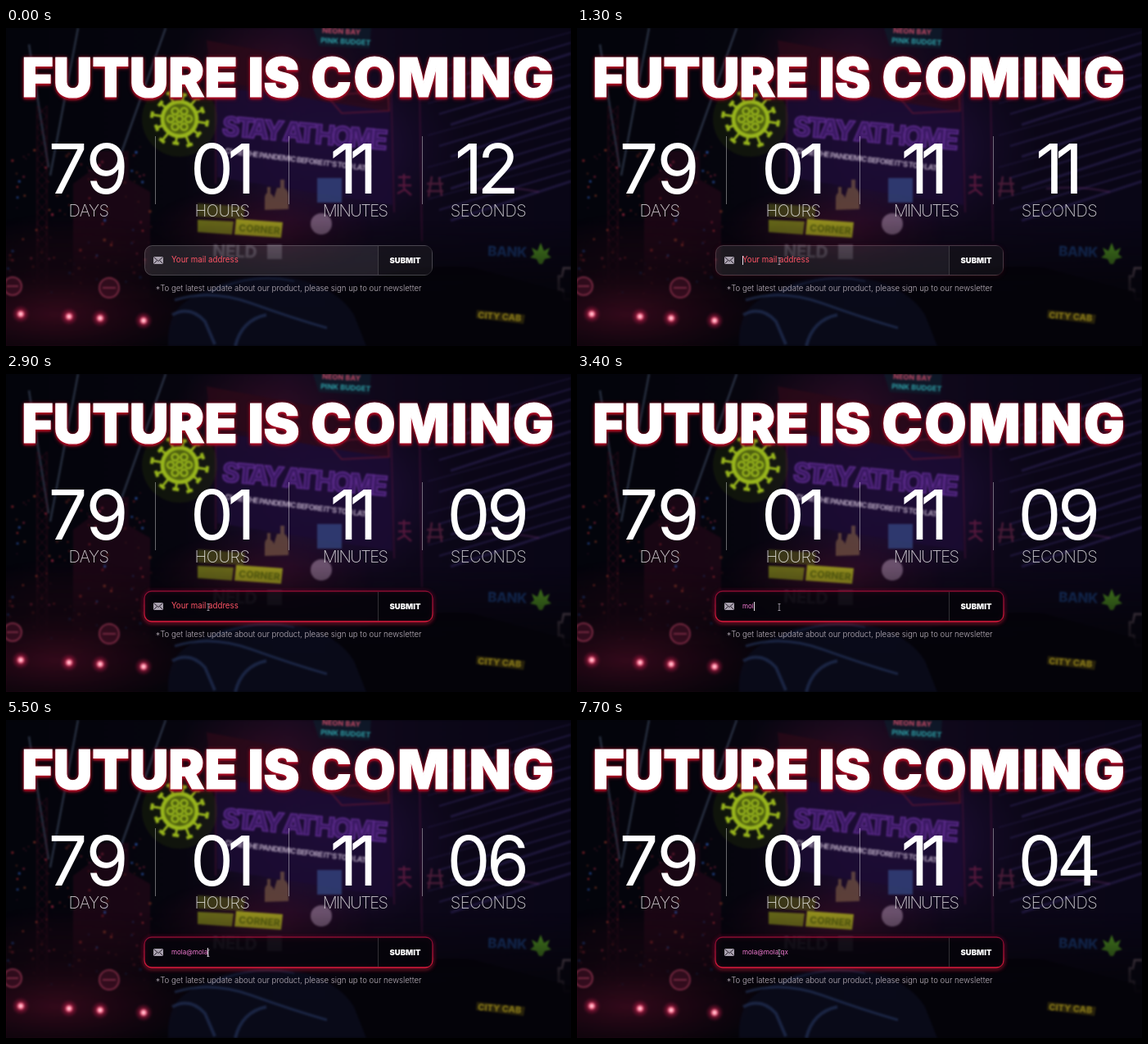
An HTML page for the animation above (8 s loop, 690 px wide and 388 px high).

```html
<!DOCTYPE html>
<html lang="en">
<head>
<meta charset="utf-8">
<title>Future is coming</title>
<style>
html, body { margin: 0; width: 100%; height: 100%; overflow: hidden; background: #05040a; }
svg { display: block; width: 690px; height: 388px; }
text { font-family: Inter, "Open Sans", sans-serif; fill: #fff; white-space: pre; }
.mid { text-anchor: middle; }
.title { font-size: 66px; font-weight: 900; stroke: #fff; stroke-width: 1.2px;
  filter: drop-shadow(0 2px 1px #b00a24) drop-shadow(0 0 2px #90081c); }
.wide { letter-spacing: 2.6px; }
.digits { font-size: 84px; font-weight: 400; }
.label { font-size: 20px; font-weight: 200; letter-spacing: -.5px; fill-opacity: .8; }
.tight { letter-spacing: -1.6px; }
.hint { font-size: 9.7px; fill: #ff5566; }
.typed { font-size: 8px; fill: #f27bd2; }
.submit { font-size: 9.5px; font-weight: 900; }
.note { font-size: 9.65px; font-weight: 300; fill: #b9b0ba; }
.scene { filter: blur(1.2px); }
.scene text { font-weight: 800; }
</style>
</head>
<body>
<svg viewBox="0 0 690 388" xmlns="http://www.w3.org/2000/svg">
  <defs>
    <linearGradient id="sky">
      <stop offset="0" stop-color="#03040b"/>
      <stop offset=".3" stop-color="#06050e"/>
      <stop offset=".5" stop-color="#150a1f"/>
      <stop offset=".75" stop-color="#0c0718"/>
      <stop offset="1" stop-color="#090616"/>
    </linearGradient>
    <radialGradient id="violet"><stop stop-color="#45207a" stop-opacity=".45"/><stop offset="1" stop-color="#2a1050" stop-opacity="0"/></radialGradient>
    <radialGradient id="red"><stop stop-color="#6e1230" stop-opacity=".5"/><stop offset="1" stop-color="#4a0a20" stop-opacity="0"/></radialGradient>
    <radialGradient id="lamp"><stop stop-color="#fff0f4"/><stop offset=".25" stop-color="#ff7d9a"/><stop offset=".5" stop-color="#b81c46" stop-opacity=".5"/><stop offset="1" stop-color="#901038" stop-opacity="0"/></radialGradient>
    <linearGradient id="road" x2="0" y2="1"><stop stop-color="#05040a" stop-opacity="0"/><stop offset=".5" stop-color="#05040a" stop-opacity=".8"/><stop offset="1" stop-color="#05040a" stop-opacity=".95"/></linearGradient>
    <linearGradient id="edge" x2="0" y2="1"><stop stop-color="#850d30"/><stop offset=".6" stop-color="#a81034"/><stop offset="1" stop-color="#dc1a3c"/></linearGradient>
    <filter id="glow" x="-20%" y="-60%" width="140%" height="220%"><feGaussianBlur stdDeviation="2.500"/></filter>
    <clipPath id="box"><rect x="169" y="265" width="352" height="37" rx="9"/></clipPath>
  </defs>

  <g class="scene">
    <rect width="690" height="388" fill="url(#sky)"/>
    <ellipse cx="390" cy="145" rx="170" ry="110" fill="url(#violet)"/>
    <ellipse cx="320" cy="50" rx="120" ry="70" fill="url(#red)" opacity=".7"/>
    <ellipse cx="70" cy="335" rx="180" ry="110" fill="url(#red)"/>
    <ellipse cx="310" cy="250" rx="140" ry="60" fill="url(#red)" opacity=".7"/>

    <g stroke="#6d84a8" stroke-width="2.500" opacity=".32">
      <path d="M88 0L54 180M28 20L52 170M195 0L131 180"/>
    </g>
    <path d="M82 330V190L112 168V150H150V185L176 200V330Z" fill="#4a1026" opacity=".3"/>
    <g stroke="#4b1024" fill="none" opacity=".55"><path id="tower"/></g>
    <g id="lights"></g>
    <g id="floors" stroke="#362a66" opacity=".45"></g>

    <path d="M256 72L468 96L472 216L258 182Z" fill="#1c0c33" opacity=".85"/>
    <path d="M256 60L256 190M470 60L474 225M505 70L508 260" stroke="#54143e" stroke-width="2" opacity=".45"/>
    <path d="M245 15L380 40L470 78L468 102L380 88L250 62Z" fill="#2c0a18" opacity=".75"/>
    <path d="M392 83L466 76L468 101L410 104Z" fill="none" stroke="#701a34" stroke-width="2" opacity=".55"/>
    <path d="M375 0H446L444 25L382 22Z" fill="#0f1f2d" opacity=".7"/>
    <text x="386" y="6" font-size="9" style="fill:#b0455f" transform="rotate(3 386 6)">NEON BAY</text>
    <text x="384" y="18" font-size="9" style="fill:#2b8f98" transform="rotate(3 384 18)">PINK BUDGET</text>

    <text x="263" y="131" font-size="33" style="fill:#3d1a66;stroke:#5f2d90;stroke-width:1.6;letter-spacing:-4.200px" transform="rotate(5 263 131)" opacity=".95">STAY AT HOME</text>
    <text x="267" y="153" font-size="9.400" style="fill:#c4b4cc;letter-spacing:-.75px" transform="rotate(7 267 153)" opacity=".8">CURE THE PANDEMIC BEFORE IT'S TOO LATE</text>

    <circle cx="212" cy="111" r="46" fill="#33440a" opacity=".25"/>
    <g id="virus" fill="none" stroke="#97b41c"></g>

    <rect x="380" y="183" width="30" height="30" fill="#3a5290" opacity=".65"/>
    <circle cx="385" cy="239" r="13" fill="#a98ca9" opacity=".55"/>
    <g opacity=".6">
      <text x="252" y="279" font-size="21" style="fill:#8f7f92;letter-spacing:-.5px" transform="rotate(2 252 279)">NELD</text>
      <rect x="319" y="264" width="18" height="18" fill="#8f7f92"/>
    </g>
    <path d="M316 222V208q0-5 3-7v-7h4v8q4 2 4 6l4-13h4v-10h5v10q5 4 5 10v16z" fill="#8f6c4c" opacity=".55"/>
    <path d="M234 214L292 218L290 233L234 230Z" fill="#77801c" opacity=".4"/>
    <path d="M234 234L278 236L276 252L234 249Z" fill="#98a41c" opacity=".6"/>
    <path d="M281 233L338 237L336 256L279 252Z" fill="#c0c81f" opacity=".7"/>
    <text x="284" y="248" font-size="12" style="fill:#4d560c" transform="rotate(4 284 248)" opacity=".8">CORNER</text>

    <g fill="none" stroke-width="2.500" opacity=".4">
      <path d="M479 182h15M486 178v18M479 192h16M478 202l9-5 8 7" stroke="#b52f63"/>
      <path d="M514 190h20M520 181l-4 25M529 182l3 23M514 199h20" stroke="#a03a62"/>
      <path d="M573 196q40-4 78 4" stroke="#5a2b63"/>
    </g>
    <text x="588" y="278" font-size="17" style="fill:#20509a;letter-spacing:-.5px" transform="rotate(2 588 278)" opacity=".65">BANK</text>
    <path d="M0-14L4-4L11-8L8 0L13 4L5 6L2 12H-2L-5 6L-13 4L-8 0L-11-8L-4-4Z" fill="#5fb023" opacity=".85" transform="translate(653 276)"/>
    <path d="M690 293h-9l-2 10h-4v16h5l2 12h8" fill="none" stroke="#c0a0ac" stroke-width="3" opacity=".6"/>

    <rect y="235" width="690" height="153" fill="url(#road)"/>
    <ellipse cx="60" cy="350" rx="170" ry="60" fill="url(#red)" opacity=".8"/>
    <path d="M390 330Q470 285 570 292L690 325V388H390Z" fill="#040309" opacity=".8"/>
    <path d="M198 388Q196 348 222 332Q270 300 330 302Q400 310 425 350L440 388Z" fill="#0a0c1c" opacity=".8"/>
    <g fill="none" stroke="#2b3f6c" opacity=".5">
      <path d="M206 332Q250 318 300 336T392 366" stroke-width="3"/>
      <path d="M203 350q22-12 40 8l12 28M318 350q-30 6-38 38" stroke-width="4"/>
      <path d="M250 322Q300 298 352 309" stroke-width="1.500"/>
    </g>
    <path d="M575 344L634 350L632 361L574 354Z" fill="#7a6a12" opacity=".3"/>
    <text x="576" y="354" font-size="11" style="fill:#b8a420" transform="rotate(4 576 354)" opacity=".65">CITY CAB</text>
    <g fill="#6a1c38" fill-opacity=".5" stroke="#a33a58" stroke-width="2" opacity=".65">
      <circle cx="8" cy="315" r="11"/><path d="M1 315h14"/>
      <circle cx="126" cy="317" r="12"/><path d="M118 317h16"/>
    </g>
    <g id="lamps" fill="url(#lamp)"></g>
  </g>

  <g class="title mid">
    <text x="151" y="83.500">FUTURE</text><text x="327" y="83.500">IS</text><text class="wide" x="522" y="83.500">COMING</text>
  </g>
  <path d="M182.500 132V215M345.500 132V215M508.500 132V215" stroke="#fff" stroke-opacity=".4"/>
  <g class="digits mid" id="fixed"></g>
  <g class="digits mid" id="secs"></g>
  <g class="label mid">
    <text x="101" y="230">DAYS</text><text x="264" y="230">HOURS</text>
    <text class="tight" x="426" y="230">MINUTES</text><text x="589" y="230">SECONDS</text>
  </g>

  <g id="idle">
    <rect x="169.500" y="265.500" width="351" height="36" rx="9" fill="#fff" fill-opacity=".11" stroke="#fff" stroke-opacity=".22"/>
  </g>
  <g id="focus">
    <rect x="169" y="266" width="352" height="37" rx="9" fill="none" stroke="url(#edge)" stroke-width="3" opacity=".75" filter="url(#glow)"/>
    <rect x="169" y="265" width="352" height="37" rx="9" fill="#06040b" fill-opacity=".75" stroke="url(#edge)" stroke-width="1.300"/>
  </g>
  <g clip-path="url(#box)">
    <rect x="454" y="266" width="66" height="35" fill="#05030a" fill-opacity=".45"/>
    <path d="M454.500 266V301" stroke="#fff" stroke-opacity=".18"/>
  </g>
  <rect x="180" y="279" width="12" height="9" rx="1" fill="#a8a1ae"/>
  <path d="M180.500 279.500L186 284.500L191.500 279.500M180.500 287.500L184.500 283.500M191.500 287.500L187.500 283.500" fill="none" stroke="#1c1522" stroke-width=".9"/>
  <text class="hint" id="hint" x="202" y="286">Your mail address</text>
  <text class="typed" id="typed" x="202" y="286"></text>
  <rect id="caret" y="278" width="1" height="11" fill="#e9dfea"/>
  <text class="submit mid" x="487.500" y="287">SUBMIT</text>
  <text class="note mid" x="345" y="320.500">*To get latest update about our product, please sign up to our newsletter</text>

  <g id="mouse">
    <path id="beam" d="M-1.500-4H1.500M0-4V4M-1.500 4H1.500" stroke="#c8c0cc" fill="none" stroke-width=".7"/>
    <path id="arrow" d="M0 0V10L2.400 7.800L4 11.300L5.500 10.600L4 7.300H7Z" fill="#fff" stroke="#111" stroke-width=".6"/>
  </g>
</svg>

<script>
const $ = id => document.getElementById(id);
const LOOP = 8000, BLINK = 515, FOCUS = 1225;
const MAIL = "mola@mola.qx";
const KEYS = [2960, 3160, 3360, 3560, 4460, 4960, 5060, 5260, 5360, 6460, 6960, 7090];

let seed = 7;
const rnd = () => (seed = seed * 16807 % 2147483647) / 2147483647;
const repeat = (n, f) => Array.from({ length: n }, (_, i) => f(i)).join("");

// Static scenery
$("lights").innerHTML = repeat(130, () => {
  const x = rnd() * 178, y = 145 + rnd() * 180;
  const hue = rnd() < .8 ? 340 + rnd() * 35 : 220;
  return `<circle cx="${x}" cy="${y}" r="${.6 + rnd() * 1.3}" fill="hsl(${hue} 60% 48%)" opacity="${.2 + rnd() * .5}"/>`;
});
$("floors").innerHTML = repeat(15, i => {
  const y = 25 + i * 13;
  return `<path d="M${515 + i % 3 * 14} ${y + 28}L690 ${y - 20}" stroke-width="${1 + i % 3}"/>`;
});
$("tower").setAttribute("d", "M38 95V330M50 95V330" + repeat(18, i => `M38 ${95 + i * 13}l12 13M50 ${95 + i * 13}l-12 13`));
$("lamps").innerHTML = [[18, 349], [77, 352], [115, 354], [168, 357]]
  .map(([x, y]) => `<circle cx="${x}" cy="${y}" r="11"/>`).join("");
$("virus").innerHTML =
  `<circle cx="212" cy="111" r="21" stroke-width="5" fill="#4f610f"/>` +
  repeat(12, i => {
    const a = (i + .3) * Math.PI / 6, c = Math.cos(a), s = Math.sin(a), r = i % 2 ? 30 : 34;
    const x = 212 + c * r, y = 111 + s * r;
    return `<path d="M${212 + c * 21} ${111 + s * 21}L${x} ${y}" stroke-width="3"/>
      <path d="M${x - s * 4} ${y + c * 4}L${x + s * 4} ${y - c * 4}" stroke-width="4"/>`;
  }) +
  repeat(7, i => {
    const a = i * Math.PI / 3, r = i ? 11 : 0;
    return `<circle cx="${212 + Math.cos(a) * r}" cy="${111 + Math.sin(a) * r}" r="4" stroke-width="2.5"/>`;
  });

// Digits sit side by side; a 1 takes half the room
function digits(cx, value) {
  const adv = d => d === "1" ? 24 : 48;
  const list = [...value];
  let x = cx - list.reduce((sum, d) => sum + adv(d), 0) / 2;
  return list.map(d => {
    const mid = x + adv(d) / 2;
    x += adv(d);
    return `<text x="${mid}" y="202">${d}</text>`;
  }).join("");
}
$("fixed").innerHTML = digits(99.5, "79") + digits(263.5, "01") + digits(424.5, "11");

const ease = p => { p = Math.min(1, Math.max(0, p)); return p * p * (3 - 2 * p); };
const show = (id, on) => $(id).setAttribute("visibility", on ? "visible" : "hidden");

function drawMouse(t) {
  const a = ease((t - 60) / 700), b = ease((t - 940) / 260);
  const x = 80 + 155 * a + 12 * b;
  const y = 355 - 39 * a - 31.5 * b;
  const overText = (y > 311 && y < 323 && x > 181) || (y > 265 && y < 302);
  $("mouse").setAttribute("transform", `translate(${x} ${y})`);
  show("beam", t > 60 && overText);
  show("arrow", t > 60 && !overText);
}

function drawField(t) {
  const p = ease((t - FOCUS) / 360);
  $("idle").setAttribute("opacity", 1 - p);
  $("focus").setAttribute("opacity", p);

  const n = KEYS.filter(k => k <= t).length;
  const text = MAIL.slice(0, n);
  if ($("typed").textContent !== text) $("typed").textContent = text;
  show("hint", !n);

  const since = t - (n ? KEYS[n - 1] : FOCUS);
  show("caret", since >= 0 && Math.floor(since / BLINK) % 2 === 0);
  $("caret").setAttribute("x", 202 + (n ? Math.round($("typed").getComputedTextLength()) : 0));
}

let shown = "";
function draw(t) {
  const left = String(12 - Math.floor((t + 540) / 1000)).padStart(2, "0");
  if (left !== shown) $("secs").innerHTML = digits(589, shown = left);
  drawMouse(t);
  drawField(t);
}

const start = performance.now();
function tick() {
  draw((performance.now() - start) % LOOP);
  requestAnimationFrame(tick);
}
tick();
</script>
</body>
</html>
```
